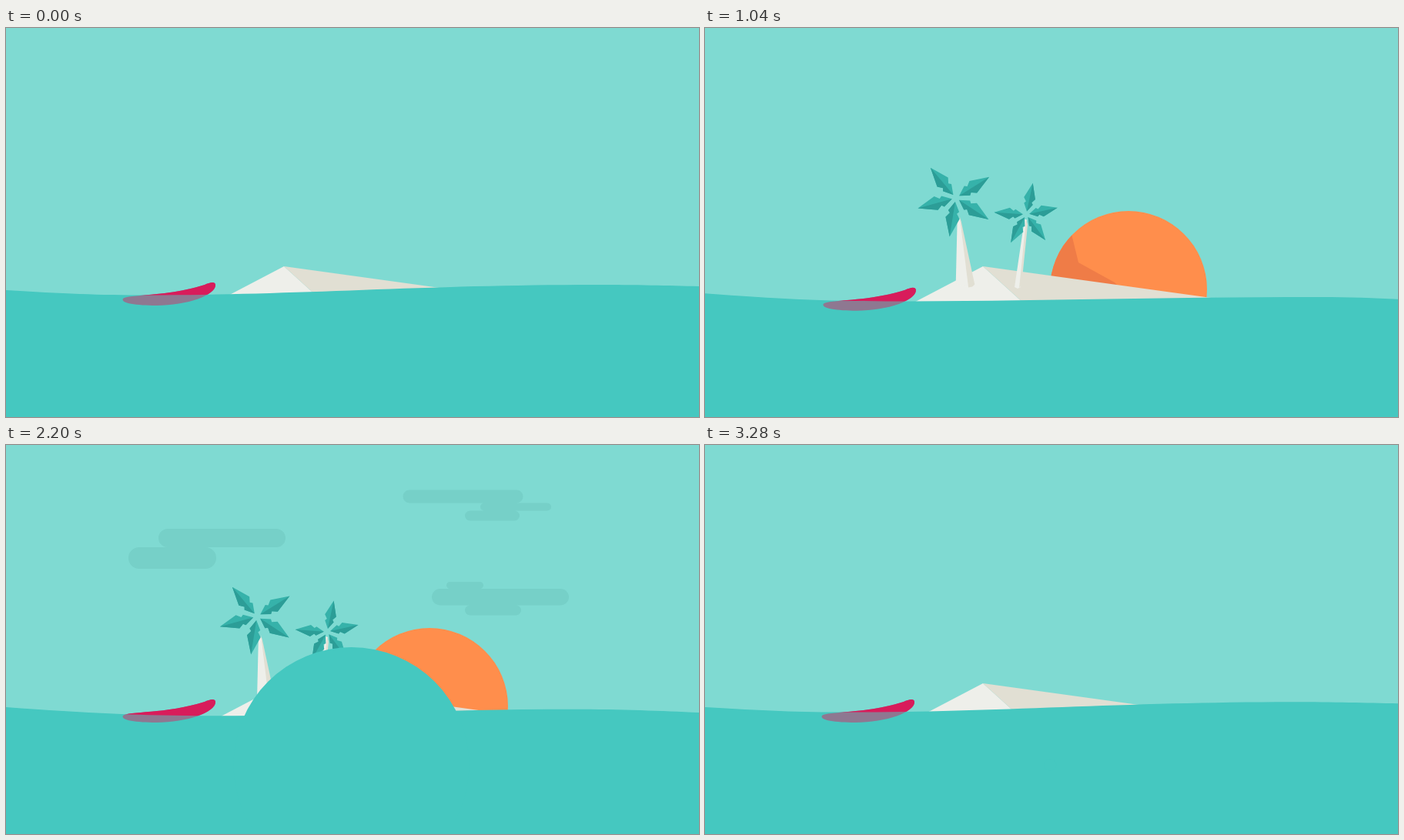
These frames come from a looping animation (900 px wide and 506 px high, 3.32 s). An HTML page with a canvas:

```html
<!DOCTYPE html>
<html lang="en">
<head>
<meta charset="utf-8">
<title>Island</title>
<style>
html, body { margin: 0; height: 100%; overflow: hidden; background: #7fdad2; }
canvas { display: block; }
</style>
</head>
<body>
<canvas id="stage" width="900" height="506"></canvas>
<script>
const ctx = document.getElementById('stage').getContext('2d');
const LOOP = 3320, STEP = 40;
const SKY = '#7fdad2', WATER = '#45c8c0', SAND = '#eeefea', SHADE = '#e1dfd3';

const clamp = p => Math.max(0, Math.min(1, p));
const smooth = p => p * p * (3 - 2 * p);
const backOut = (p, s) => 1 + (s + 1) * (p - 1) ** 3 + s * (p - 1) ** 2;

// Rises from 0 to 1 at the peak time, then sinks back over the rest of the loop
const swell = (t, peak) => t < peak
  ? smooth(t / peak)
  : Math.sin(Math.PI / 2 * ((LOOP - t) / (LOOP - peak)) ** 1.15);
const bob = t => t < 1680 ? Math.sin(Math.PI * t / 1680) ** 2 : 0;

function fill(color, path) {
  ctx.fillStyle = color;
  ctx.fill(path);
}

function poly(color, ...pts) {
  const path = new Path2D();
  for (let i = 0; i < pts.length; i += 2) path.lineTo(pts[i], pts[i + 1]);
  fill(color, path);
}

function disc(color, x, y, r) {
  const path = new Path2D();
  path.arc(x, y, r, 0, 2 * Math.PI);
  fill(color, path);
  return path;
}

// Draws scaled around an anchor
function scaled(x, y, k, draw) {
  if (k <= 0) return;
  ctx.save();
  ctx.translate(x, y);
  ctx.scale(k, k);
  ctx.translate(-x, -y);
  draw();
  ctx.restore();
}

// Region between the wave (left end, trough, crest, right end) and an edge of the stage
function waterPath(t, edge) {
  const left = 341 + 5 * bob(t), right = 336 + 17.5 * swell(t, 1200);
  const xt = 185 + 90 * swell(t, 1900), yt = 347.5 + 8 * swell(t, 850);
  const xc = 765 + 35 * Math.sin(2 * Math.PI * t / LOOP), yc = 334 + 16 * swell(t, 900);
  const span = xc - xt, rest = 900 - xc;
  const path = new Path2D();
  path.moveTo(0, left);
  path.bezierCurveTo(xt * .4, left + (yt - left) * .7, xt * .65, yt, xt, yt);
  path.bezierCurveTo(xt + span * .33, yt, xc - span * .38, yc, xc, yc);
  path.bezierCurveTo(xc + rest * .4, yc, xc + rest * .7, (yc + right) / 2, 900, right);
  path.lineTo(900, edge);
  path.lineTo(0, edge);
  return path;
}

function sun(t) {
  ctx.save();
  ctx.translate(0, 130 * (1 - smooth(clamp((t - 40) / 520))));
  ctx.clip(disc('#ff8e4c', 550, 340, 102));
  poly('#ef7c47', 476, 268, 485, 305, 532, 331, 560, 360, 430, 360, 430, 268);
  ctx.restore();
}

function island() {
  poly(SAND, 361, 310, 260, 363, 425, 368);
  poly(SHADE, 361, 310, 425, 368, 780, 368);
}

// Five notched leaves in a fan; the lower half of each is darker
function crown(x, y, start, size) {
  for (let i = 0; i < 5; i++) {
    const angle = (start + 65.5 * i) * Math.PI / 180;
    const side = Math.cos(angle) < -.5 ? -1 : 1;
    ctx.save();
    ctx.translate(x, y);
    ctx.rotate(angle);
    ctx.scale(size, size * side);
    poly('#36b2aa', 5, 0, 17, -7, 20, -4.5, 26, -9, 50, 0, 26, 9, 20, 4.5, 17, 7);
    poly('#2c9d97', 5, 0, 50, 0, 26, 9, 20, 4.5, 17, 7);
    ctx.restore();
  }
}

function smallPalm() {
  poly(SAND, 415, 249, 418, 250, 410, 337, 406, 339, 402, 337);
  poly(SHADE, 417, 249, 419, 256, 411, 335, 408, 338);
  crown(417, 243, -78, .83);
}

function bigPalm() {
  poly(SAND, 328, 246, 332, 251, 343, 337, 326, 332);
  poly(SHADE, 331, 247, 333, 254, 350, 333, 347, 336, 342, 337);
  crown(326, 223, -32, 1);
}

// A stack of pills, each given as left, width, height
function cloud(y, ...pills) {
  const path = new Path2D();
  for (const [x, w, h] of pills) {
    path.roundRect(x, y, w, h, h / 2);
    y += h;
  }
  fill('#76d0c8', path);
}

function clouds() {
  cloud(109, [198, 165, 24], [159, 114, 28]);
  cloud(58.5, [515.5, 156, 17], [616, 92, 10], [596, 71, 13]);
  cloud(178, [572, 48, 9], [553, 178, 21.5], [596, 73, 13]);
}

const hull = new Path2D('M152 352C158 346 208 350 258 334C264 331 272 329 272 334' +
  'C273 347 236 361 195 361C170 361 148 358 152 352Z');

function boat(t) {
  const drawHull = color => {
    ctx.translate(2.2 * bob(t), 7.8 * bob(t));
    fill(color, hull);
  };
  ctx.save();
  drawHull('#8e7891');
  ctx.restore();
  ctx.save();
  ctx.clip(waterPath(t, 0));
  drawHull('#d81c5b');
  ctx.restore();
}

function floodRadius(t) {
  if (t < 1713) return 0;
  if (t < 2700) return Math.min(658, 153 * ((t - 1713) / 487) ** 5);
  return 658 * (1 - smooth((t - 2700) / 620));
}

function draw(t) {
  const flooded = t > 2500;
  const grow = (start, s) => t < start || flooded ? 0 : backOut(clamp((t - start) / 360), s);
  ctx.fillStyle = SKY;
  ctx.fillRect(0, 0, 900, 506);
  scaled(445, 140, grow(1220, 1.7), clouds);
  if (!flooded) sun(t);
  island();
  scaled(402, 314, grow(700, 1.7), smallPalm);
  scaled(338, 315, grow(780, .8), bigPalm);
  fill(WATER, waterPath(t, 506));
  boat(t);
  disc(WATER, 448.5, 416, floodRadius(t));
}

// The picture holds for one step at a time; the small lead absorbs timer rounding
const start = performance.now();
function frame() {
  const steps = Math.floor((performance.now() - start + 4) / STEP);
  draw(steps * STEP % LOOP);
  requestAnimationFrame(frame);
}
frame();
</script>
</body>
</html>
```
